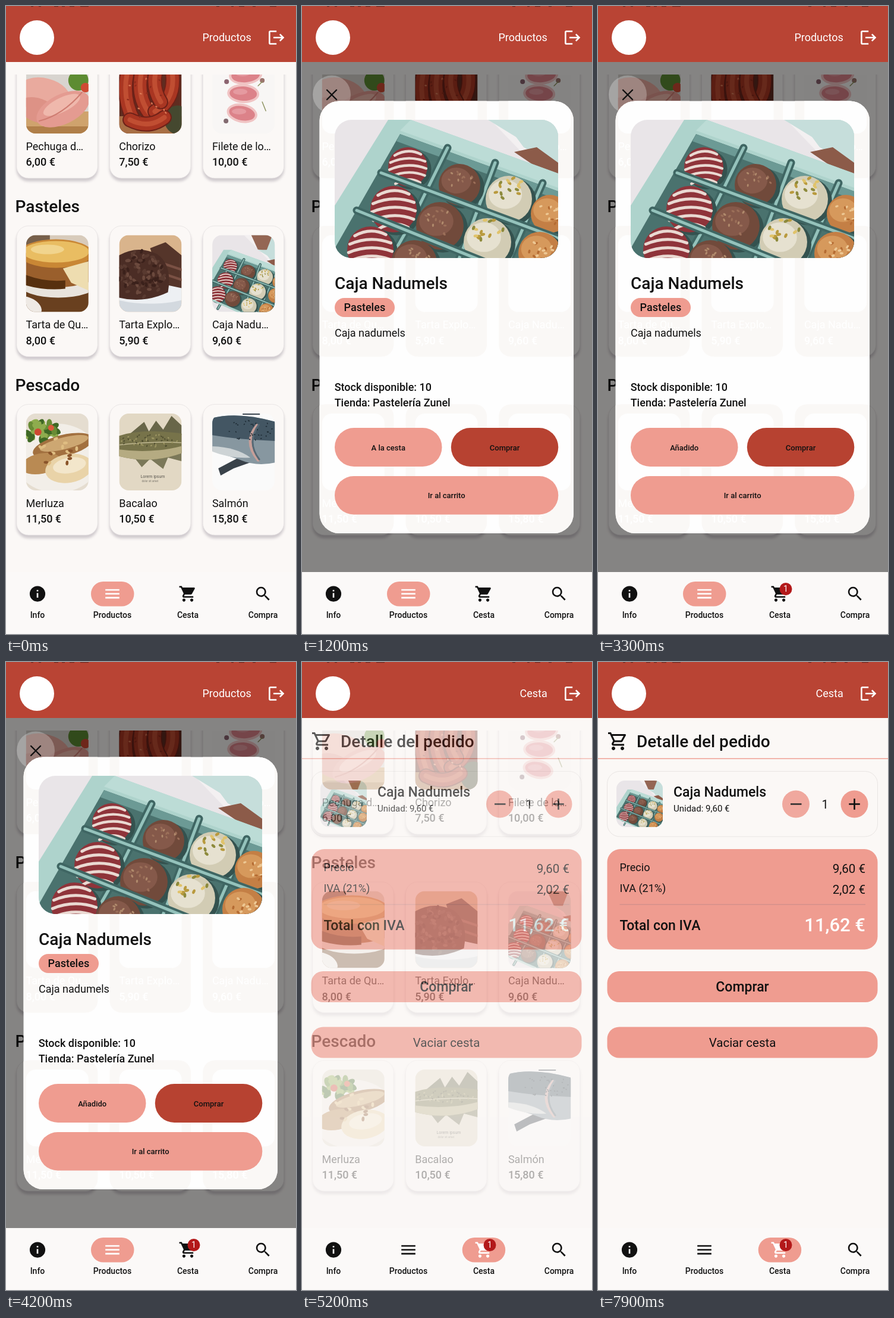
These frames come from a looping animation (488 px wide and 1054 px high, 8 s). An HTML page:

```html
<!DOCTYPE html>
<html lang="es">
<head>
<meta charset="utf-8">
<title>Tienda</title>
<style>
html, body { margin: 0; width: 100%; height: 100%; overflow: hidden; background: #fbf8f6; }
svg { display: block; position: absolute; left: 0; top: 0; }
text { font-family: Roboto, "Noto Sans", sans-serif; fill: #111; white-space: pre; }
.m { font-weight: 500; }
.card { filter: drop-shadow(0 5px 2px rgba(70, 60, 80, .24)); }
</style>
</head>
<body>
<svg id="stage" width="488" height="1054" viewBox="0 0 488 1054"></svg>
<script>
const PINK = '#ef9c90', RED = '#b94434', PAPER = '#fbf8f6', INK = '#111';
const PRODUCT = 'Caja Nadumels';
let clips = 0, seed = 7;
const rnd = () => (seed = seed * 16807 % 2147483647) / 2147483647;

// Markup helpers
const rect = (x, y, w, h, r, fill, more = '') =>
  `<rect x="${x}" y="${y}" width="${w}" height="${h}" rx="${r}" fill="${fill}" ${more}/>`;
const disc = (x, y, r, fill) => `<circle cx="${x}" cy="${y}" r="${r}" fill="${fill}"/>`;
const oval = (x, y, rx, ry, fill, turn = 0) =>
  `<ellipse cx="${x}" cy="${y}" rx="${rx}" ry="${ry}" fill="${fill}" transform="rotate(${turn} ${x} ${y})"/>`;
const poly = (pts, fill) => `<polygon points="${pts}" fill="${fill}"/>`;
const shape = (d, fill) => `<path d="${d}" fill="${fill}"/>`;
const line = (d, color, w) =>
  `<path d="${d}" fill="none" stroke="${color}" stroke-width="${w}" stroke-linecap="round"/>`;
const text = (x, y, size, str, more = '') => `<text x="${x}" y="${y}" font-size="${size}" ${more}>${str}</text>`;
const MED = ' class="m"', MID = ' text-anchor="middle"', END = ' text-anchor="end"', WHITE = ' style="fill:#fff"';
const group = (id, inner) => `<g id="${id}">${inner}</g>`;
const icon = (d, cx, cy, size, fill = INK, id = '') =>
  `<path id="${id}" d="${d}" fill="${fill}" transform="translate(${cx - size / 2} ${cy - size / 2}) scale(${size / 24})"/>`;
const clipped = (x, y, w, h, r, inner) => {
  const id = 'clip' + clips++;
  return `<clipPath id="${id}">${rect(x, y, w, h, r, '#000')}</clipPath><g clip-path="url(#${id})">${inner}</g>`;
};
const photo = (x, y, w, h, r, inner, scale = 1, dx = 0, dy = 0) => clipped(x, y, w, h, r,
  `<g transform="translate(${x + dx} ${y + dy}) scale(${scale})">${inner}</g>`);
const crumbs = (n, x, y, w, h, size, colors) => Array.from({ length: n }, () => {
  const a = rnd() * 6.28, q = Math.sqrt(rnd());
  return oval(x + Math.cos(a) * q * w, y + Math.sin(a) * q * h, size, size * .6,
    colors[rnd() * colors.length | 0], rnd() * 180);
}).join('');

const WHEELS = 'M7 18c-1.1 0-1.99.9-1.99 2S5.9 22 7 22s2-.9 2-2-.9-2-2-2zM17 18c-1.1 0-1.99.9-1.99 2s.89 2 1.99 2 2-.9 2-2-.9-2-2-2z';
const ICON = {
  exit: 'M17 7l-1.41 1.41L18.17 11H8v2h10.17l-2.58 2.58L17 17l5-5zM4 5h8V3H4c-1.1 0-2 .9-2 2v14c0 1.1.9 2 2 2h8v-2H4z',
  info: 'M12 2a10 10 0 1 0 0 20 10 10 0 0 0 0-20zm1 15h-2v-6h2zm0-8h-2V7h2z',
  menu: 'M3 18h18v-2H3zm0-5h18v-2H3zm0-7v2h18V6z',
  cart: WHEELS + 'M1 2v2h2l3.6 7.59-1.35 2.45c-.16.28-.25.61-.25.96 0 1.1.9 2 2 2h12v-2H7.42c-.14 0-.25-.11-.25-.25l.03-.12.9-1.63h7.45c.75 0 1.41-.41 1.75-1.03l3.58-6.49c.08-.14.12-.31.12-.48 0-.55-.45-1-1-1H5.21l-.94-2z',
  cartLine: WHEELS + 'M15.55 13c.75 0 1.41-.41 1.75-1.03l3.58-6.49A.996.996 0 0 0 20.01 4H5.21l-.94-2H1v2h2l3.6 7.59-1.35 2.44C4.52 15.37 5.48 17 7 17h12v-2H7l1.1-2zM6.16 6h12.15l-2.76 5H8.53z',
  find: 'M15.5 14h-.79l-.28-.27A6.47 6.47 0 0 0 16 9.5 6.5 6.5 0 1 0 9.5 16c1.61 0 3.09-.59 4.23-1.57l.27.28v.79l5 4.99L20.49 19zm-6 0a4.5 4.5 0 1 1 0-9 4.5 4.5 0 0 1 0 9z'
};

// Chocolate box, drawn on a 376 square
function truffle(kind, x, y, r) {
  const shade = oval(x + 5, y + 4, r * 1.05, r * 1.02, '#34524f');
  if (kind === 'stripe') {
    let s = shade + disc(x, y, r, '#8f343a');
    for (let k = -.7; k < .9; k += .36) {
      const h = r * Math.sqrt(1 - k * k) * .94, v = y + k * r;
      s += line(`M${x - h} ${v + 4}Q${x} ${v - r * .28} ${x + h} ${v + 2}`, '#ead9d2', r * .13);
    }
    return s;
  }
  const [base, light, bits, size, lift] = {
    milk: ['#714a3b', '#85594a', ['#9b6f59', '#b08a6c'], .07, .1],
    white: ['#d2ccb4', '#e6e1d0', ['#b99a3e', '#8d8a3c', '#e0c36a'], .1, .4],
    nut: ['#c47f45', '#d6995c', ['#edc793', '#b56c33'], .09, 0]
  }[kind];
  return shade + disc(x, y, r, base) + oval(x - r * .15, y - r * .2, r * .72, r * .62, light)
    + crumbs(14, x, y - r * lift, r * .75, r * .55, r * size, bits);
}
const wall = d => line(d, '#3f6663', 13) + line(d, '#94c2bb', 5);
const truffles = (...list) => list.map(a => truffle(...a)).join('');
const BOX = rect(0, 0, 376, 376, 0, '#e9e5e8')
  + poly('190,0 376,0 376,190 262,72', '#f3f0f1')
  + poly('230,0 376,0 376,150 318,118', '#c6dedb')
  + poly('226,0 330,0 300,78 258,70', '#946654')
  + poly('258,72 376,72 376,146 330,116', '#c6dedb')
  + poly('302,126 340,118 376,144 376,176', '#8c5b49')
  + poly('90,72 128,72 376,162 376,376 170,376 0,304 0,216', '#aed3cc')
  + poly('110,90 128,72 376,162 376,186', '#bcdcd6')
  + poly('110,96 376,192 376,376 180,376 0,300 0,288', '#4a726e')
  + poly('110,96 376,192 376,206 104,108', '#6c9a95')
  + wall('M190 119L125 251L62 360') + wall('M270 144L215 291L180 376') + wall('M350 178L295 304L262 376')
  + truffles(['stripe', 123, 151, 33], ['milk', 210, 181, 35], ['white', 293, 205, 39], ['nut', 362, 230, 32])
  + wall('M78 161L376 271')
  + truffles(['stripe', 99, 222, 39], ['milk', 177, 250, 40], ['white', 257, 277, 40], ['nut', 345, 296, 36])
  + wall('M37 224L376 360')
  + truffles(['stripe', 60, 290, 39], ['milk', 134, 312, 38], ['white', 214, 347, 38], ['nut', 300, 370, 36])
  + line('M0 302L170 378', '#aed3cc', 9);

// Product pictures, 105 by 129
const full = fill => rect(0, 0, 105, 129, 0, fill);
const PICS = {
  chicken: full('#d8d4cf') + disc(88, 40, 17, '#5d8c32') + disc(100, 52, 8, '#cf4a33')
    + rect(0, 92, 105, 37, 0, '#cfa36d') + rect(0, 117, 105, 12, 0, '#b07f49')
    + oval(30, 66, 46, 30, '#e9aa9e', 14) + oval(20, 90, 34, 20, '#dd9286', 20) + oval(62, 88, 48, 25, '#e49b91', -26)
    + oval(60, 81, 34, 12, '#efb8ac', -26) + line('M22 108Q62 98 94 60', '#cf7d72', 2),
  chorizo: full('#5f2c20') + rect(0, 100, 105, 29, 0, '#a86f45') + oval(98, 106, 22, 24, '#45482f')
    + ['M16 18Q2 65 25 108', 'M42 10Q25 60 50 94', 'M88 20Q98 70 60 92', 'M65 15Q52 48 70 76', 'M18 106Q50 122 76 102']
      .map(d => line(d, '#6d2118', 25) + line(d, '#a93622', 21) + line(d, '#c04e32', 8)).join('')
    + crumbs(18, 50, 70, 38, 45, 2, ['#dc7c58', '#8d2a1b']),
  filete: full('#f8f6f5') + [[56, 31], [52, 62], [50, 95]].map(([x, y], i) =>
      oval(x, y, 28 - i, 16, '#f0c4c4', i * 8 - 5) + oval(x, y, 24 - i, 12, '#dc8289', i * 8 - 5)
      + oval(x - 5, y - 3, 12, 5, '#e59aa0')).join('')
    + disc(24, 42, 4, '#8c6470') + disc(84, 40, 4, '#9c746e') + disc(23, 108, 4, '#826a70')
    + line('M84 42L77 49M84 76L90 91', '#8d9360', 1.5),
  cheesecake: full('#d8cbbb') + rect(0, 92, 105, 37, 0, '#69401f') + rect(0, 0, 40, 18, 0, '#77604b')
    + oval(54, 82, 66, 23, '#e9e4dd') + shape('M-8 30H108V78Q60 96-8 82Z', '#9a5f2c')
    + shape('M-8 64Q30 80 66 76V90Q30 94-8 82Z', '#57300f')
    + oval(50, 31, 62, 24, '#c98735') + oval(50, 28, 56, 18, '#e9bd62') + oval(36, 24, 28, 8, '#f1d48d')
    + poly('62,56 105,44 105,93 76,80', '#eeddb0') + oval(6, 119, 22, 13, '#eee9e4', 30),
  chocolate: full('#d9b48c') + rect(0, 95, 105, 34, 0, '#d3d9df') + oval(52, 98, 70, 17, '#edf0f3')
    + poly('52,22 78,12 105,34 105,89 72,82', '#55352a') + line('M72 47L105 58M72 64L105 75', '#7a5144', 4)
    + shape('M-4 36Q30 15 64 32Q90 50 82 96Q40 116-4 104Z', '#4b2d25')
    + crumbs(90, 39, 65, 40, 39, 4, ['#6b493d', '#3b211b', '#593a30']),
  merluza: full('#e5ddd0') + oval(52, 75, 72, 58, '#f2eee8') + crumbs(30, 27, 29, 28, 18, 8, ['#688c35', '#3f6825', '#8eac4e'])
    + disc(20, 31, 6, '#cd4932') + disc(42, 24, 5, '#d95b3c')
    + oval(62, 54, 52, 18, '#a2703f', -14) + oval(64, 50, 42, 10, '#cda772', -14)
    + oval(25, 84, 34, 17, '#b98a53', -12) + oval(72, 92, 40, 24, '#e9d3a8', -10) + oval(73, 87, 28, 13, '#f3e6cb', -10)
    + crumbs(15, 52, 65, 36, 25, 4, ['#8a542a', '#dfbd82']),
  bacalao: full('#e2d8c4') + poly('18,34 42,14 50,30 62,12 74,27 88,4 105,20 105,36', '#686649')
    + poly('24,72 38,90 52,76 74,93 82,74 105,80 105,62', '#7b7859') + shape('M-2 38Q38 24 107 34V66Q52 86-2 71Z', '#77734a')
    + shape('M-2 60Q55 68 107 54V66Q52 86-2 71Z', '#b5ab82') + line('M-2 53Q50 46 107 49', '#c1b993', 1.5)
    + crumbs(50, 50, 46, 48, 11, 1.7, ['#504e30', '#a19a66'])
    + text(36, 108, 7, 'Lorem ipsum', 'opacity=".65"') + text(38, 115, 4.5, 'dolor sit amet', 'opacity=".5"'),
  salmon: full('#fafafa') + poly('10,92 48,72 70,80 36,92 14,104', '#39424a')
    + shape('M-2 8Q42-4 107 14V82Q74 90 45 77L-2 62Z', '#8797a0') + shape('M-2 8Q42-4 107 14V46Q45 44-2 36Z', '#435663')
    + shape('M-2 55Q40 56 64 74Q30 76-2 63Z', '#cdd3d5') + line('M75 20Q52 48 77 78', '#c69f99', 5)
    + line('M78 19Q57 48 79 77', '#566975', 3) + crumbs(34, 62, 28, 42, 19, 1.4, ['#1e2b34'])
    + rect(51, 0, 29, 2, 0, '#3b4650')
};

const COLS = [17.8, 174.5, 331.2], ROWS = [69.5, 369, 668.5];
const GOODS = [
  [['chicken', 'Pechuga d…', '6,00 €'], ['chorizo', 'Chorizo', '7,50 €'], ['filete', 'Filete de lo…', '10,00 €']],
  [['cheesecake', 'Tarta de Qu…', '8,00 €'], ['chocolate', 'Tarta Explo…', '5,90 €'], ['box', 'Caja Nadu…', '9,60 €']],
  [['merluza', 'Merluza', '11,50 €'], ['bacalao', 'Bacalao', '10,50 €'], ['salmon', 'Salmón', '15,80 €']]
];
const eachGood = fn => GOODS.map((row, r) => row.map((good, c) => fn(COLS[c], ROWS[r], ...good)).join('')).join('');
const labels = (x, y, name, price, more = '') =>
  text(x + 15.7, y + 172, 18, name, more) + text(x + 15.7, y + 198.5, 18, price, MED + more);

const card = (x, y, pic, name, price) =>
  rect(x, y, 136.5, 219.5, 20, PAPER, 'class="card" stroke="#e5e1e1" stroke-width=".8"')
  + (pic === 'box' ? photo(x + 16, y + 15.5, 105, 129, 16, BOX, .343, -12) : photo(x + 16, y + 15.5, 105, 129, 16, PICS[pic]))
  + labels(x, y, name, price);
// Faint imprint of a card showing through the sheet
const imprint = (x, y, pic, name, price) =>
  rect(x, y, 136.5, 219.5, 20, '#faf8f6') + rect(x + 16, y + 15.5, 105, 129, 16, '#fefefe')
  + labels(x, y, name, price, WHITE);

const products = clipped(0, 115, 488, 835, 0, eachGood(card)
  + text(15.5, 346, 28, 'Pasteles', MED) + text(15.5, 646, 28, 'Pescado', MED));

const button = (id, x, y, w, h, r, label, size, base, fill = PINK, more = MED) =>
  group(id, rect(x, y, w, h, r, fill) + text(x + w / 2, base, size, label, MID + more));

const modal = rect(0, 94, 488, 856, 0, '#000', 'opacity=".47"')
  + `<g opacity=".26">${disc(50, 148.5, 32, '#fff')}</g>` + line('M42 141l16 16M58 141l-16 16', INK, 2.4)
  + rect(29.5, 159.5, 427.5, 725.5, 33, '#fefefe') + clipped(29.5, 159.5, 427.5, 725.5, 33, eachGood(imprint))
  + photo(55, 191, 376, 232, 28, BOX, 1, 0, -72)
  + text(55, 475, 28, PRODUCT, MED)
  + rect(55, 490, 101, 32, 16, PINK) + text(70.5, 512, 18, 'Pasteles', MED)
  + text(55, 555, 18, 'Caja nadumels')
  + text(54.7, 646, 18, 'Stock disponible: 10', MED) + text(54.7, 672, 18, 'Tienda: Pastelería Zunel', MED)
  + button('add', 55, 708, 180.5, 65, 32.5, 'A la cesta', 13, 745.5)
  + button('buy', 250.8, 708, 180.5, 65, 32.5, 'Comprar', 13, 745.5, '#b74231')
  + button('go', 55, 789, 376.3, 64.5, 32, 'Ir al carrito', 13, 826);

const cart = rect(0, 94, 488, 856, 0, PAPER)
  + icon(ICON.cartLine, 33.5, 133, 36) + text(65, 143, 28, 'Detalle del pedido', MED)
  + rect(0, 161.5, 488, 1.4, 0, PINK)
  + rect(15.5, 183.5, 455, 109.5, 21, PAPER, 'stroke="#e9e5e3"')
  + photo(31, 199, 78, 78, 14, BOX, .2075)
  + text(127, 226, 23, PRODUCT, MED) + text(127, 251, 15, 'Unidad: 9,60 €')
  + group('minus', disc(333, 238.5, 23, PINK) + rect(324, 237.2, 18.5, 2.6, 0, INK))
  + text(382, 245.5, 20, '1', MID)
  + disc(431.5, 238.5, 23, PINK) + rect(422.3, 237.2, 18.5, 2.6, 0, INK) + rect(430.2, 229.3, 2.6, 18.5, 0, INK)
  + rect(15.5, 314, 455, 168.5, 22, PINK)
  + text(36.5, 351, 18, 'Precio') + text(450, 353.5, 20.5, '9,60 €', END)
  + text(36.5, 386, 18, 'IVA (21%)') + text(450, 388.5, 20.5, '2,02 €', END)
  + rect(36.5, 406.3, 413.5, 1.4, 0, '#d2908a')
  + text(36.5, 450, 23, 'Total con IVA', MED) + text(450, 452, 31, '11,62 €', MED + END + WHITE)
  + button('order', 15.5, 519, 455, 52, 20, 'Comprar', 23, 553)
  + button('clear', 15.5, 612.5, 455, 52, 20, 'Vaciar cesta', 20.5, 645.5, PINK, '');

const header = rect(0, 0, 488, 94, 0, RED)
  + [[42, 4], [55, 4], [81, 7], [94, 5], [107, 8], [125, 14], [354, 5], [379, 4], [392, 9], [415, 5], [444, 11]]
    .map(([x, w]) => rect(x, 0, w, 1.2, 0, '#6b2a20')).join('')
  + disc(52, 53, 29, '#fff')
  + text(412.7, 59, 18, 'Productos', 'id="title"' + WHITE + END)
  + icon(ICON.exit, 455.2, 53, 31.5, '#fff');

const tabs = [['info', 'Info', 53], ['menu', 'Productos', 179], ['cart', 'Cesta', 306], ['find', 'Compra', 432.5]];
const nav = rect(0, 950, 488, 104, 0, '#fbf9f8') + rect(143, 966, 72.5, 41.5, 20.7, PINK, 'id="pill"')
  + tabs.map(([key, label, x]) => icon(ICON[key], x, 986.5, 31.5, INK, 'tab-' + key)
    + text(x, 1027, 14, label, MED + MID)).join('')
  + group('badge', disc(316, 978.5, 10.5, '#b3191a') + text(316, 983.3, 14, '1', MID + WHITE));

stage.innerHTML = rect(0, 0, 488, 1054, 0, PAPER) + products
  + group('modal', modal) + group('cart', cart) + header + nav;

// Opacity steps: [start ms, value]
const FADES = {
  modal: [[0, 0], [1100, .5], [1200, 1], [5000, .5], [5100, 0]],
  add: [[0, 1], [2200, .4], [2300, .6], [2400, .88], [2500, 1]],
  badge: [[0, 0], [2300, 1]],
  go: [[0, 1], [4800, .5], [4900, .8], [5000, 1]],
  cart: [[0, 0], [5200, .68], [5300, 1]],
  minus: [[0, 1], [7900, .86]]
};
const el = id => document.getElementById(id);
const nodes = Object.fromEntries(Object.keys(FADES).map(id => [id, el(id)]));
const title = el('title'), pill = el('pill'), addLabel = el('add').lastChild;
const menuIcon = el('tab-menu'), cartIcon = el('tab-cart');
let last = -1;

function draw(now) {
  const t = Math.floor(now % 8000 / 100) * 100;
  if (t !== last) {
    last = t;
    for (const id in FADES) {
      const v = FADES[id].filter(s => s[0] <= t).pop()[1];
      nodes[id].setAttribute('opacity', v);
      nodes[id].style.display = v ? '' : 'none';
    }
    const inCart = t >= 5200;
    title.textContent = inCart ? 'Cesta' : 'Productos';
    addLabel.textContent = t >= 2300 ? 'Añadido' : 'A la cesta';
    pill.setAttribute('x', inCart ? 269.7 : 143);
    menuIcon.setAttribute('fill', inCart ? INK : '#fff');
    cartIcon.setAttribute('fill', inCart ? '#fff' : INK);
  }
  requestAnimationFrame(() => draw(performance.now()));
}
draw(performance.now());
</script>
</body>
</html>
```
